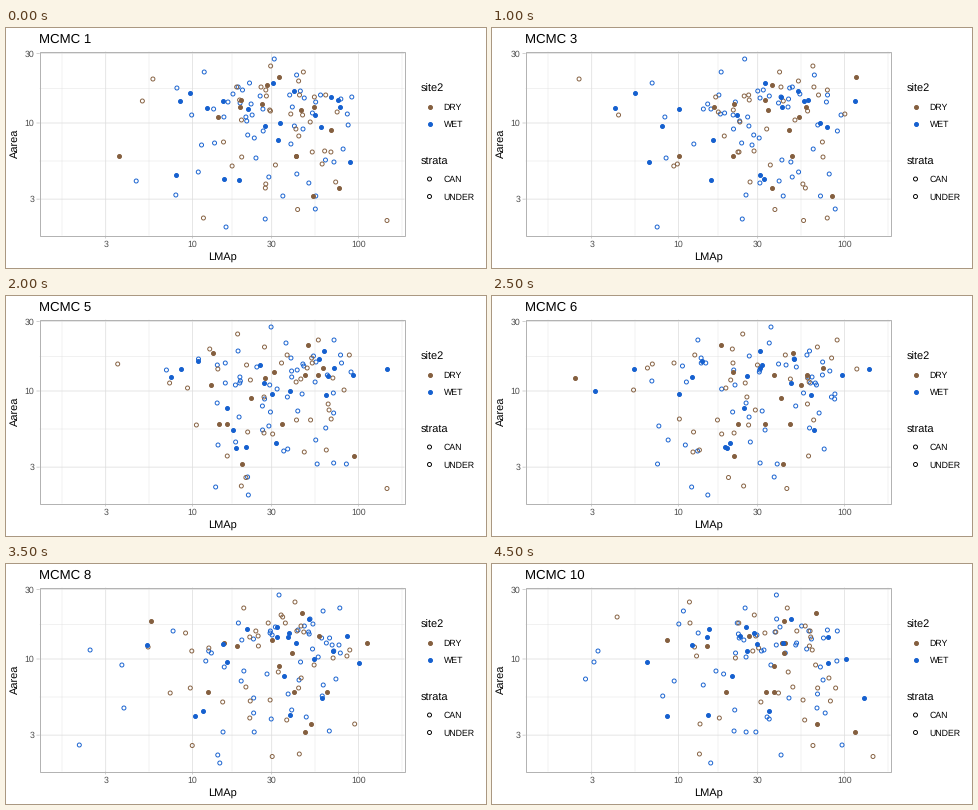
A matplotlib script for the animation above (5000 ms loop, 480 px wide and 240 px high).

```python
import numpy as np
import matplotlib.pyplot as plt
from matplotlib.animation import FuncAnimation
from matplotlib.patches import Rectangle

W, H, DPI = 480, 240, 100
FRAMES, INTERVAL = 10, 500
PX = 72 / DPI  # points per pixel
BROWN, BLUE = "#845f3f", "#1560cf"
LEFT, TOP, RIGHT, BOTTOM = 33.5, 23.5, 398.5, 207.5

plt.rcParams.update({"font.family": "Liberation Sans", "text.hinting": "none"})
rng = np.random.default_rng(11)
fig = plt.figure(figsize=(W / DPI, H / DPI), dpi=DPI, facecolor="white")
ax = fig.add_axes([0, 0, 1, 1])
ax.set(xlim=(0, W), ylim=(H, 0))
ax.axis("off")


def line(xs, ys, width, color, z):
    ax.plot(xs, ys, lw=width * PX, color=color, zorder=z,
            solid_capstyle="butt", snap=False)


def label(x, y, s, size, color="black", **kw):
    kw = {"ha": "left", "va": "baseline", **kw}
    return ax.text(x, y, s, fontsize=size * PX, color=color, **kw)


def dots(xs, ys, edge, face="none", z=4):
    return ax.scatter(xs, ys, s=(4 * PX) ** 2, facecolors=face,
                      edgecolors=edge, linewidths=0.95 * PX, zorder=z,
                      snap=False)


def x_pos(v):
    return 186.5 + 166 * np.log10(v / 10)


def y_pos(v):
    return 95 - 145.6 * np.log10(v / 10)


# Grid, ticks and frame
GRID, BORDER, TICK_TEXT = "#dedede", "#b3b3b3", "#4d4d4d"
for x in (56, 143, 226, 309, 396):
    line([x, x], [TOP, BOTTOM], 0.4, GRID, 1)
for y in (60.3, 133):
    line([LEFT, RIGHT], [y, y], 0.4, GRID, 1)
for v in (3, 10, 30, 100):
    x = x_pos(v)
    line([x, x], [TOP, BOTTOM], 0.75, GRID, 1)
    line([x, x], [BOTTOM, BOTTOM + 3], 0.6, BORDER, 1)
    label(x, 219.2, str(v), 8.8, TICK_TEXT, ha="center")
for v in (3, 10, 30):
    y = y_pos(v)
    line([LEFT, RIGHT], [y, y], 0.75, GRID, 1)
    line([LEFT - 3, LEFT], [y, y], 0.6, BORDER, 1)
    label(28.4, y + 3.2, str(v), 8.8, TICK_TEXT, ha="right")
ax.add_patch(Rectangle((LEFT, TOP), RIGHT - LEFT, BOTTOM - TOP, fill=False,
                       ec=BORDER, lw=PX, zorder=6))

label(216, 232, "LMAp", 11, ha="center")
label(14, 115.5, "Aarea", 11, ha="right", va="center", rotation=90)
title = label(33, 15.2, "", 13.2)

# Legends
label(414.7, 64.3, "site2", 11)
label(414.7, 136.3, "strata", 11)
for y, s, edge, face in ((78.5, "DRY", BROWN, BROWN), (95.8, "WET", BLUE, BLUE),
                         (151, "CAN", "black", "none"),
                         (168.5, "UNDER", "black", "none")):
    dots([423.5], [y], edge, face)
    label(437.6, y + 3.2, s, 8.8)

# Each point keeps its height; canopy points are (height, typical x)
dry_can = [(49, 291), (57, 268), (72, 257), (76, 263), (79, 250), (79, 285),
           (82, 240), (89, 255), (102, 290), (127.5, 190), (127.5, 250),
           (127.5, 285), (159.5, 290), (167.5, 322)]
wet_can = [(55, 275), (63, 285), (65, 180), (69, 268), (72, 290), (73, 245),
           (73, 345), (79, 300), (79.5, 265), (81, 190), (87, 270), (95, 310),
           (97.5, 235), (99, 300), (112, 232), (134, 300), (147, 260),
           (151, 255), (152, 225)]
dry_under = [38, 44, 51, 53, 59, 59, 62, 67, 67, 68, 69, 72, 73, 82, 83, 84,
             86, 87, 92, 94, 101, 108, 114, 123, 124, 124, 129, 136, 137, 138,
             154, 156, 160, 181.5, 190, 192.5]
wet_under = [31, 44, 47, 55, 59, 60, 62, 63, 66, 67, 67, 68, 69, 70, 71, 74,
             74, 75, 76, 79, 81, 81, 85, 86, 87, 87, 89, 89, 93, 97, 98, 101,
             103, 107, 110, 115, 116, 117, 121, 130, 132, 134, 144, 146, 149,
             153, 155, 167, 168, 168, 181, 191, 199]
OUTER = {31: 265, 190: 252, 192.5: 320, 199: 211}


def with_mid(heights):
    return [(y, OUTER.get(y, 267)) for y in heights]


def cloud(points, color, face, spread):
    """Markers, their heights and their x in every frame."""
    y, mid = np.array(points, float).T
    sd = np.where(np.isin(y, (31, 199)), 0.45, spread)
    # left-skewed draws around each point's typical place
    x = mid + sd * (108 - rng.gamma(4, 27, (FRAMES, len(y))))
    return dots(mid, y, color, face), y, np.clip(x, 52, 381)


groups = [cloud(with_mid(wet_under), BLUE, "none", 1.0),
          cloud(with_mid(dry_under), BROWN, "none", 1.0),
          cloud(dry_can, BROWN, BROWN, 0.8),
          cloud(wet_can, BLUE, BLUE, 0.8)]


def update(i):
    title.set_text(f"MCMC {i + 1}")
    for art, y, x in groups:
        art.set_offsets(np.column_stack([x[i], y]))
    return [title] + [g[0] for g in groups]


anim = FuncAnimation(fig, update, frames=FRAMES, interval=INTERVAL,
                     init_func=lambda: update(0), repeat=True, repeat_delay=0)
plt.show()
```
